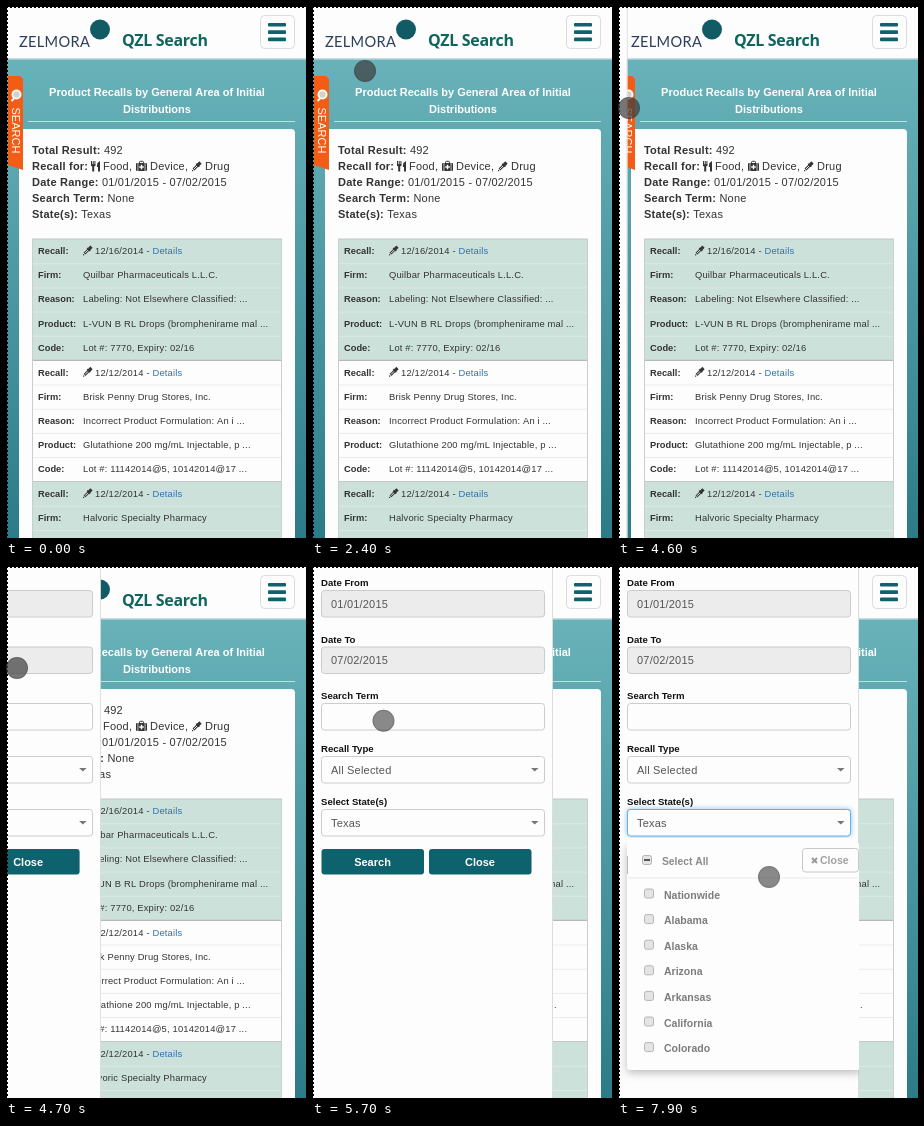
Recreate the animation shown at these times as an HTML page with a canvas. Size 300 by 532 pixels, loop 8000 ms.

```html
<!DOCTYPE html>
<html lang="en">
<head>
<meta charset="utf-8">
<title>Recall search</title>
<style>
html, body { margin: 0; width: 100%; height: 100%; overflow: hidden; background: #fff; }
canvas { display: block; width: 300px; height: 532px; }
</style>
</head>
<body>
<canvas id="stage"></canvas>
<script>
const W = 300, H = 532, LOOP = 8000, STEP = 100;
const TEAL = '#0e626e', INK = '#333', PANEL_W = 240;
const SANS = '"Liberation Sans", Arial, sans-serif';
const canvas = document.getElementById('stage');
const ctx = canvas.getContext('2d');
const dpr = window.devicePixelRatio || 1;
canvas.width = W * dpr;
canvas.height = H * dpr;

const clamp = v => Math.max(0, Math.min(1, v));
const swing = p => 0.5 - Math.cos(clamp(p) * Math.PI) / 2;

function text(s, x, y, { size = 11, bold = false, color = INK, gap = 0, align = 'left', family = SANS } = {}) {
  ctx.font = `${bold ? 'bold ' : ''}${size}px ${family}`;
  ctx.letterSpacing = gap + 'px';
  ctx.textAlign = align;
  ctx.fillStyle = color;
  ctx.fillText(s, x, y);
  return ctx.measureText(s).width;
}

function rect(x, y, w, h, color) {
  ctx.fillStyle = color;
  ctx.fillRect(x, y, w, h);
}

function box(x, y, w, h, r, fill, line) {
  ctx.beginPath();
  ctx.roundRect(x, y, w, h, r);
  if (fill) { ctx.fillStyle = fill; ctx.fill(); }
  if (line) { ctx.strokeStyle = line; ctx.lineWidth = 1; ctx.stroke(); }
}

function disc(x, y, r, color) {
  ctx.beginPath();
  ctx.arc(x, y, r, 0, 7);
  ctx.fillStyle = color;
  ctx.fill();
}

function poly(points, color) {
  ctx.beginPath();
  points.forEach(([x, y]) => ctx.lineTo(x, y));
  ctx.fillStyle = color;
  ctx.fill();
}

function line(x1, y1, x2, y2, color, width = 1) {
  ctx.beginPath();
  ctx.moveTo(x1, y1);
  ctx.lineTo(x2, y2);
  ctx.strokeStyle = color;
  ctx.lineWidth = width;
  ctx.stroke();
}

function dropper(x, y) {
  line(x + 1.5, y + 8.5, x + 6, y + 4, INK, 2.6);
  line(x + 2, y + 8, x + 5.2, y + 4.8, '#e8efed', 1);
  line(x + 4.2, y + 2.8, x + 7.2, y + 5.8, INK, 1.5);
  line(x + 6, y + 4, x + 8.5, y + 1.5, INK, 3.2);
  rect(x, y + 9, 1.2, 1.2, INK);
}

function cutlery(x, y) {
  for (let i = 0; i < 3; i++) rect(x + i * 1.7, y, 1, 4, INK);
  rect(x, y + 3.2, 4.4, 2, INK);
  rect(x + 1.2, y + 4, 2, 6.5, INK);
  poly([[x + 9, y], [x + 9, y + 10.5], [x + 7, y + 10.5], [x + 7, y + 6], [x + 5.8, y + 6], [x + 6.4, y + 2]], INK);
}

function medkit(x, y) {
  box(x + 3.5, y + 0.8, 4, 3, 1, null, INK);
  box(x, y + 2.5, 11, 8, 1, INK);
  rect(x + 1.6, y + 2.5, 0.7, 8, '#fff');
  rect(x + 8.7, y + 2.5, 0.7, 8, '#fff');
  rect(x + 4.8, y + 4.2, 1.4, 4.6, '#fff');
  rect(x + 3.2, y + 5.8, 4.6, 1.4, '#fff');
}

const groups = [
  ['12/16/2014 - ', 'Quilbar Pharmaceuticals L.L.C.', 'Labeling: Not Elsewhere Classified: ...',
    'L-VUN B RL Drops (bromphenirame mal ...', 'Lot #: 7770, Expiry: 02/16'],
  ['12/12/2014 - ', 'Brisk Penny Drug Stores, Inc.', 'Incorrect Product Formulation: An i ...',
    'Glutathione 200 mg/mL Injectable, p ...', 'Lot #: 11142014@5, 10142014@17 ...'],
  ['12/12/2014 - ', 'Halvoric Specialty Pharmacy']
];
const rowNames = ['Recall:', 'Firm:', 'Reason:', 'Product:', 'Code:'];

function table() {
  const cell = { size: 9.4, gap: 0.17 };
  groups.forEach((rows, g) => {
    const top = 233 + g * 121.3;
    rect(26, top, 250, 121.3, g % 2 ? '#fdfdfd' : '#cde1db');
    for (let i = 1; i < 5; i++) {
      line(27, top + i * 24.2 + 0.5, 275, top + i * 24.2 + 0.5, g % 2 ? '#ebebeb' : '#dce9e5');
    }
    line(26, top, 276, top, g === 1 ? '#a3aaa8' : '#bfc6c4');
    rows.forEach((value, i) => {
      const y = top + 15.2 + i * 24.1;
      text(rowNames[i], 32, y, { size: 9.3, bold: true });
      if (i) return text(value, 77, y, cell);
      dropper(77, y - 9);
      const w = text(value, 89, y, cell);
      text('Details', 89 + w, y, { ...cell, color: '#2a73b4' });
    });
  });
  line(26.5, 233, 26.5, H, '#c9cfcd');
  line(275.5, 233, 275.5, H, '#c9cfcd');
}

function summary() {
  const o = { size: 11, gap: 0.22 };
  const pair = (label, value, y) => {
    const w = text(label + ' ', 26, y, { ...o, bold: true });
    text(value, 26 + w, y, o);
  };
  pair('Total Result:', '492', 148);
  pair('Recall for:', '', 164);
  pair('Date Range:', '01/01/2015 - 07/02/2015', 180);
  pair('Search Term:', 'None', 196);
  pair('State(s):', 'Texas', 212);
  cutlery(85, 155);
  text('Food,', 97, 164, o);
  medkit(130, 154.5);
  text('Device,', 144, 164, o);
  dropper(186, 155);
  text('Drug', 199, 164, o);
}

function searchTab() {
  poly([[2, 70], [14, 70], [17, 73], [17, 164], [2, 159]], '#f25c14');
  line(8, 92.5, 5.5, 95, '#fff', 2);
  disc(10.5, 88.5, 5, '#fff');
  disc(10.5, 88.5, 3.2, '#d9cfc9');
  ctx.save();
  ctx.translate(5.5, 101.5);
  ctx.rotate(Math.PI / 2);
  text('SEARCH', 0, 0, { color: '#fff' });
  ctx.restore();
}

function page() {
  const bg = ctx.createLinearGradient(0, 53, 0, H);
  bg.addColorStop(0, '#69b2ba');
  bg.addColorStop(1, '#2b7c88');
  rect(0, 0, W, H, bg);
  rect(0, 0, W, 52.5, '#fdfdfd');
  rect(0, 52.5, W, 1, '#d5e4e6');

  text('ZELMORA', 13, 40.5, { size: 14.6, color: '#2c3f5c', gap: 0.3, family: 'Lato, sans-serif' });
  disc(94, 23.5, 10, '#125a64');
  text('QZL Search', 116, 40, { size: 16, bold: true, color: '#10655f', gap: -0.3, family: '"Open Sans", sans-serif' });
  box(254.5, 9.5, 34, 33, 4, '#fdfdfd', '#dcdcdc');
  for (let i = 0; i < 3; i++) box(262, 17 + i * 7.3, 18, 3.6, 1, TEAL);

  const title = { bold: true, color: '#fff', align: 'center' };
  text('Product Recalls by General Area of Initial', 151, 90, title);
  text('Distributions', 151, 107, title);
  line(22, 115.5, 289, 115.5, '#c4dde0');
  box(13, 123, 276, 430, 4, '#fdfdfd');
  summary();
  table();
  searchTab();
}

function field(label, value, y, kind) {
  text(label, 9, y - 4, { size: 9.6, bold: true, color: '#111' });
  if (kind === 'focus') {
    ctx.save();
    ctx.shadowColor = 'rgba(102,175,233,.7)';
    ctx.shadowBlur = 5 * dpr;
    box(9.5, y + 0.5, 223, 26, 3, '#fff', '#66afe9');
    ctx.restore();
  }
  box(9.5, y + 0.5, 223, 26.5, 3, kind === 'fixed' ? '#ececec' : '#fdfdfd', kind === 'focus' ? '#66afe9' : '#cccccc');
  text(value, 19, y + 17.5, { color: '#555', gap: 0.2 });
  if (kind === 'focus' || kind === 'select') {
    poly([[219, y + 12], [226.5, y + 12], [222.75, y + 15.5]], '#777');
  }
}

function checkbox(x, y, mixed) {
  box(x, y, 9, 9, 2, '#e4e4e4', '#b5b5b5');
  if (mixed) rect(x + 1.5, y + 3.5, 6, 2, '#555');
}

function stateList() {
  ctx.save();
  ctx.shadowColor = 'rgba(0,0,0,.25)';
  ctx.shadowBlur = 8 * dpr;
  ctx.shadowOffsetY = 3 * dpr;
  box(9, 277, 234, 227, 3, '#fdfdfd');
  ctx.restore();
  rect(9, 272, 231, 8, '#fdfdfd');
  line(9.5, 290, 9.5, 308, '#b8b8b8');
  rect(10, 311.5, 230, 1, '#e9e9e9');
  checkbox(24.5, 289.5, true);
  text('Select All', 44, 298.5, { size: 10.3, bold: true, color: '#8a8a8a' });
  box(184.5, 282.5, 56, 23.5, 3, '#fdfdfd', '#c8c8c8');
  line(194, 292, 199, 297, '#999', 2);
  line(199, 292, 194, 297, '#999', 2);
  text('Close', 202, 298, { size: 10.5, bold: true, color: '#a0a0a0' });
  ['Nationwide', 'Alabama', 'Alaska', 'Arizona', 'Arkansas', 'California', 'Colorado'].forEach((name, i) => {
    const y = 332.5 + i * 25.6;
    checkbox(26.5, y - 9.5);
    text(name, 46, y, { size: 10.5, bold: true, color: '#7c7c7c' });
  });
}

function panel(t) {
  const shown = PANEL_W * swing((t - 4560) / 325);
  if (shown <= 0) return;
  const open = t >= 7100;
  ctx.save();
  ctx.translate(shown - PANEL_W, 0);
  ctx.beginPath();
  ctx.rect(0, 0, PANEL_W + 1, H);
  ctx.clip();
  rect(0, 0, PANEL_W, H, '#fdfdfd');
  rect(PANEL_W, 0, 1, H, '#d9dedd');
  field('Date From', '01/01/2015', 24, 'fixed');
  field('Date To', '07/02/2015', 80.5, 'fixed');
  field('Search Term', '', 137, 'text');
  field('Recall Type', 'All Selected', 190, 'select');
  field('Select State(s)', 'Texas', 243, open ? 'focus' : 'select');
  [['Search', 9.5], ['Close', 117]].forEach(([name, x]) => {
    box(x, 283, 102.5, 25.5, 3, TEAL);
    text(name, x + 51, 300, { bold: true, color: '#fff', align: 'center' });
  });
  if (open) stateList();
  ctx.restore();
}

// time, x, y, eased arrival
const path = [
  [1700, 261, 25], [2400, 53, 65], [2500, 22, 82], [2600, 13, 96], [2800, 11, 102],
  [5400, 11, 102], [6200, 207, 273, true], [6400, 214, 270], [6500, 214, 270],
  [6700, 218, 260], [7200, 218, 260], [7900, 151, 311, true]
];

function pointer(t) {
  if (t < path[0][0]) return;
  let i = 1;
  while (i < path.length - 1 && t > path[i][0]) i++;
  const [t0, x0, y0] = path[i - 1], [t1, x1, y1, eased] = path[i];
  let p = clamp((t - t0) / (t1 - t0));
  if (eased) p = swing(p);
  const x = x0 + (x1 - x0) * p, y = y0 + (y1 - y0) * p;
  const pressed = (t >= 4000 && t < 4800) || (t >= 6900 && t < 7200);
  const alpha = pressed || t < 2600 ? 0.7 : 0.6;
  disc(x, y, 11, `rgba(60,60,60,${alpha})`);
  ctx.beginPath();
  ctx.arc(x, y, 10.4, 0, 7);
  ctx.strokeStyle = 'rgba(60,60,60,.25)';
  ctx.lineWidth = 1;
  ctx.stroke();
}

function edges() {
  rect(0, 0, W, 1, '#000');
  rect(0, 0, 1, H, '#000');
  ctx.setLineDash([2, 2]);
  line(0, 1.5, W, 1.5, '#000');
  line(1.5, 0, 1.5, H, '#000');
  ctx.setLineDash([]);
}

function draw(t) {
  ctx.setTransform(dpr, 0, 0, dpr, 0, 0);
  page();
  panel(t);
  edges();
  pointer(t);
}

const start = performance.now();
function tick() {
  const t = (performance.now() - start) % LOOP;
  draw(Math.floor(t / STEP) * STEP);
  requestAnimationFrame(tick);
}
tick();
</script>
</body>
</html>
```
